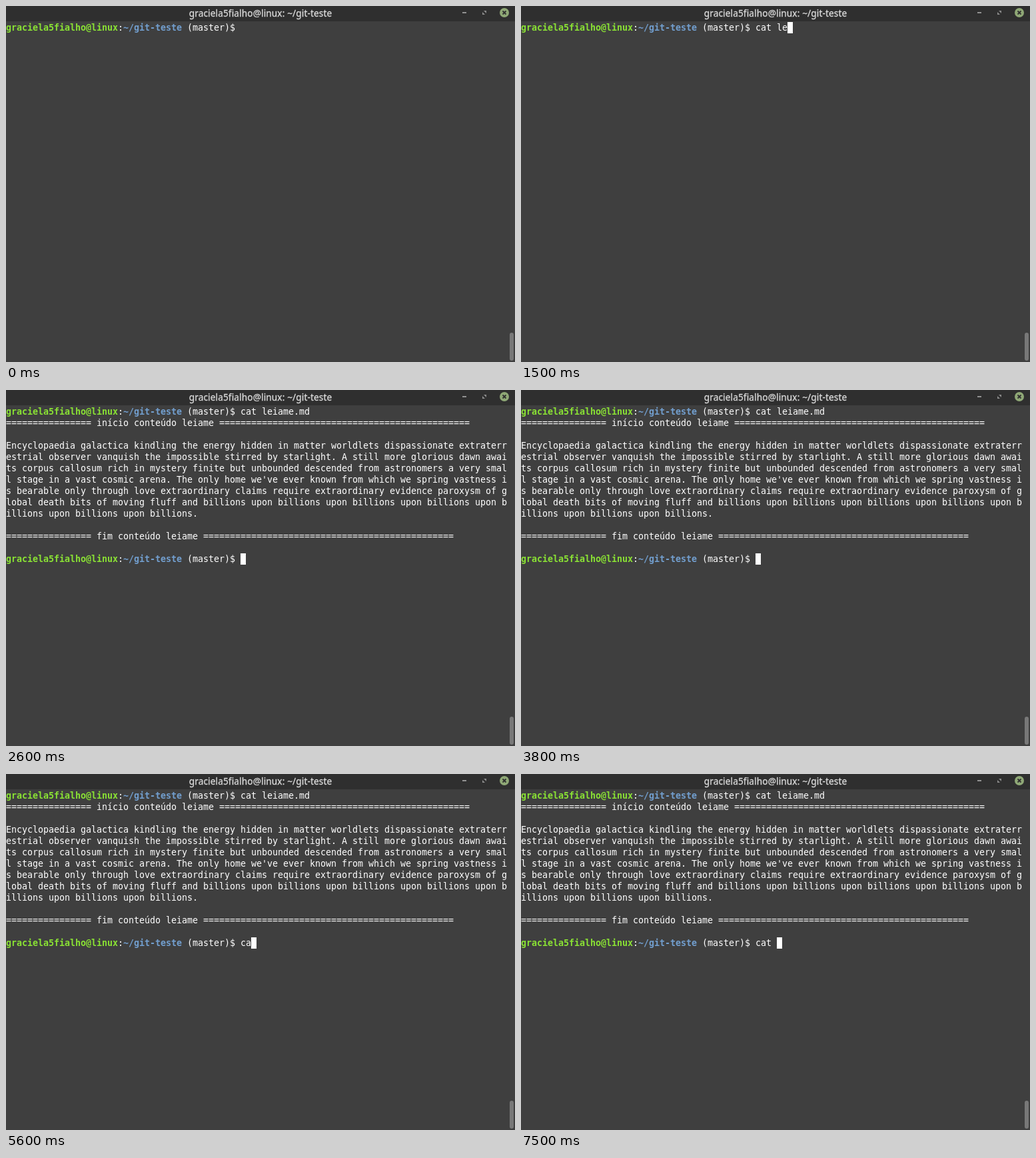
Recreate the animation shown at these times as an HTML page. Size 764 px wide and 534 px high, loop 8000 ms.

```html
<!DOCTYPE html>
<html lang="pt">
<head>
<meta charset="utf-8">
<title>Terminal</title>
<style>
  html, body { margin: 0; width: 100%; height: 100%; overflow: hidden; background: #3f3f3f; }
  header {
    position: absolute; width: 764px; height: 23px; background: #2f2f2f; color: #dadada;
    font: 500 13.6px/22px "Noto Sans", sans-serif; text-align: center;
    letter-spacing: .14px; -webkit-text-stroke: .3px;
  }
  svg { position: absolute; left: 0; top: 0; }
  pre {
    position: absolute; left: 0; top: 24px; margin: 0; color: #fff;
    font: 13.333px/17px "DejaVu Sans Mono", monospace;
    letter-spacing: calc(8px - 1ch); /* 8px cell grid */
  }
  .user { color: #8ae234; }
  .path { color: #729fcf; }
  .cursor { display: inline-block; width: 8px; height: 17px; background: #fff; vertical-align: top; }
</style>
</head>
<body>
<header id="title"></header>
<svg width="764" height="534">
  <path d="M685 10h6" stroke="#929292" stroke-width="2"/>
  <path d="M717 7h4v4zM715 9v4h4z" fill="#8c8c8c"/>
  <circle cx="748" cy="10" r="7" fill="#8fa876"/>
  <path d="M745.5 7.5l5 5m0-5l-5 5" stroke="#2f2f2f" stroke-width="1.8"/>
  <rect x="756" y="490" width="6" height="42" rx="3" fill="#787878"/>
</svg>
<pre id="screen"></pre>
<script>
const LOOP = 8000;
const user = 'graciela5fialho@linux', path = '~/git-teste';
const prompt = `<b class="user">${user}</b>:<b class="path">${path}</b> (master)$ `;
const banner = text => `${'='.repeat(16)} ${text} conteúdo leiame ${'='.repeat(47)}`;
const command = 'cat leiame.md ';
const output = `
${banner('início')}

Encyclopaedia galactica kindling the energy hidden in matter worldlets dispassionate extraterr
estrial observer vanquish the impossible stirred by starlight. A still more glorious dawn awai
ts corpus callosum rich in mystery finite but unbounded descended from astronomers a very smal
l stage in a vast cosmic arena. The only home we've ever known from which we spring vastness i
s bearable only through love extraordinary claims require extraordinary evidence paroxysm of g
lobal death bits of moving fluff and billions upon billions upon billions upon billions upon b
illions upon billions upon billions.

${banner('fim')}

`;

// The first time shows the cursor, each later one types a character.
const first = { before: '', blink: 500, tab: 1800, keys: [100, 200, 300, 400, 700, 1300, 1500, 1600] };
const second = { before: prompt + command + output, blink: 600, tab: LOOP, keys: [2600, 5000, 5600, 5900, 7500] };

function render(t) {
  const { before, blink, tab, keys } = t < second.keys[0] ? first : second;
  const pressed = keys.filter(key => key <= t);
  const completed = t >= tab;
  const lastKey = completed ? tab : pressed.at(-1);
  const typed = completed ? command : command.slice(0, Math.max(0, pressed.length - 1));
  // Every key restarts the blink with the cursor on.
  const cursorOn = Math.floor((t - lastKey) / blink) % 2 === 0;
  return before + prompt + typed + (cursorOn ? '<span class="cursor"></span>' : '');
}

const screen = document.getElementById('screen');
document.getElementById('title').textContent = `${user}: ${path}`;
let shown;

function draw(now) {
  const html = render(now % LOOP);
  if (html !== shown) screen.innerHTML = shown = html;
  requestAnimationFrame(draw);
}
draw(0);
</script>
</body>
</html>
```
